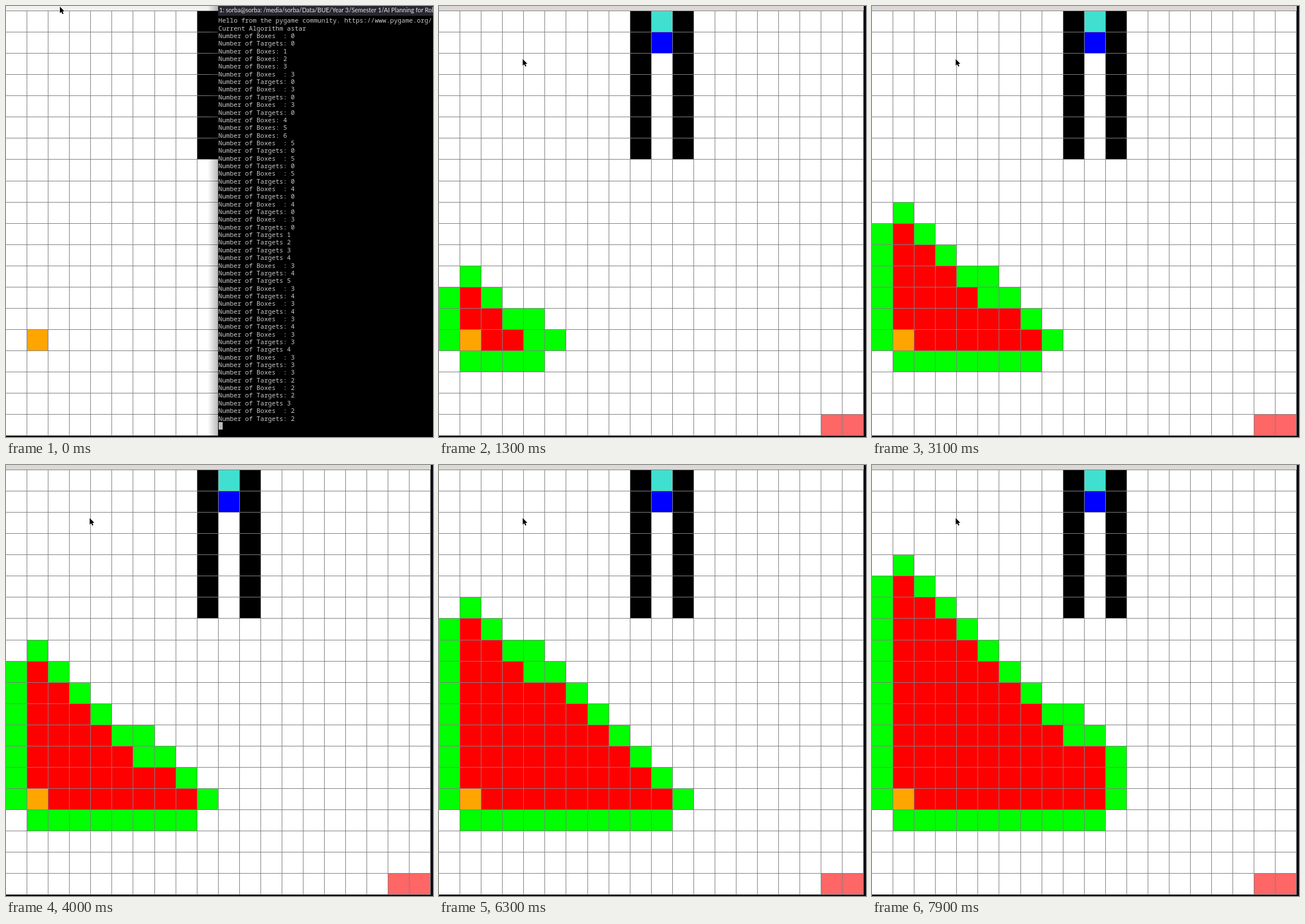
An HTML page with a canvas that plays this animation: 745 by 752 pixels, repeating every 8000 ms.

```html
<!DOCTYPE html>
<html lang="en">
<head>
<meta charset="utf-8">
<title>Grid search</title>
<style>
  html, body { margin: 0; width: 100%; height: 100%; overflow: hidden; background: #000; }
  canvas { display: block; }
</style>
</head>
<body>
<canvas id="stage" width="745" height="752"></canvas>
<script>
const W = 745, H = 752, LOOP = 8000, N = 20, EDGE = 741;
const START = [1, 15], GOAL_COL = 10;
const ctx = document.getElementById('stage').getContext('2d');

// Pixel of the grid line before column / row k
const lineX = k => Math.floor(37.05 * k - 0.3);
const lineY = k => Math.floor(8.55 + 37.06 * k);

// Cells in the order the search expands them: diagonal by diagonal, right end first
const order = [];
for (let d = 0; d <= 11; d++) {
  for (let c = Math.min(GOAL_COL, d + 1); c >= 1; c--) {
    order.push([c, START[1] - d + c - 1]);
  }
}

// Runs of search steps: start time, first step, number of steps (100 ms each)
const runs = [
  [600, 0, 3], [1000, 3, 11], [2200, 15, 1], [2400, 16, 1], [3100, 23, 2],
  [3500, 25, 15], [5100, 40, 11], [6300, 51, 9], [7300, 60, 7]
];

function stepAt(t) {
  let step = -1;
  for (const [at, first, count] of runs) {
    if (t >= at) step = first + Math.min(count - 1, Math.floor((t - at) / 100));
  }
  return step;
}

const log = ['Hello from the pygame community. https://www.pygame.org/', 'Current Algorithm astar'];
const labels = { B: 'Boxes  : ', b: 'Boxes: ', T: 'Targets: ', t: 'Targets ' };
const entries = 'B0 T0 b1 b2 b3 B3 T0 B3 T0 B3 T0 b4 b5 b6 B5 T0 B5 T0 B5 T0 B4 T0 B4 T0 ' +
  'B3 T0 t1 t2 t3 t4 B3 T4 t5 B3 T4 B3 T4 B3 T4 B3 T3 t4 B3 T3 B3 T2 B2 T2 t3 B2 T2';
for (const e of entries.split(' ')) log.push('Number of ' + labels[e[0]] + e[1]);

function rect(x, y, w, h, color) {
  ctx.fillStyle = color;
  ctx.fillRect(x, y, w, h);
}

function cell(c, r, color) {
  const x = c ? lineX(c) : 0, y = lineY(r);
  rect(x, y, lineX(c + 1) - x, lineY(r + 1) - y, color);
}

function drawSearch(step) {
  for (let i = 0; i <= step; i++) {
    const [c, r] = order[i];
    for (const [dx, dy] of [[1, 0], [-1, 0], [0, 1], [0, -1]]) cell(c + dx, r + dy, '#00ff00');
  }
  for (let i = 1; i < step; i++) cell(...order[i], '#ff0000');
}

function drawBoard(step, focused) {
  rect(0, 0, W, H, '#000');
  rect(EDGE, 0, W - EDGE, H, '#0a0b14');
  rect(0, 0, EDGE, 8, focused ? '#dcd8d5' : '#f2f1f0');
  rect(0, 8, EDGE, 742, '#fff');
  drawSearch(step);
  cell(...START, '#ffa500');
  for (let r = 0; r < 7; r++) {
    cell(9, r, '#000');
    cell(11, r, '#000');
  }
  cell(10, 0, '#40e0d0');
  cell(10, 1, '#0000ff');
  cell(18, 19, '#ff6666');
  cell(19, 19, '#ff6666');
  for (let k = 0; k <= N; k++) {
    if (k) rect(lineX(k), 8, 1, 742, '#808080');
    rect(0, lineY(k), EDGE, 1, '#808080');
  }
}

function drawTerminal() {
  const x = 370;
  const shade = ctx.createLinearGradient(x - 18, 0, x, 0);
  shade.addColorStop(0, 'rgba(0,0,0,0)');
  shade.addColorStop(1, 'rgba(0,0,0,0.28)');
  rect(x - 18, 0, 18, H, shade);
  rect(x, 0, W - x, H, '#000');
  rect(x, 0, W - x, 17, '#29272f');
  ctx.textBaseline = 'alphabetic';
  ctx.fillStyle = '#e4e4e4';
  ctx.font = '10.6px Lato, "Open Sans", sans-serif';
  ctx.fillText('1: sorba@sorba: /media/sorba/Data/BUE/Year 3/Semester 1/AI Planning for Robotics', x + 2, 11);
  ctx.fillStyle = '#c8c8c8';
  ctx.font = '11.1px "Noto Sans Mono", "DejaVu Sans Mono", monospace';
  log.forEach((s, i) => ctx.fillText(s, x + 0.5, 29.3 + i * 13.35));
  rect(x + 1, 726, 7, 13, '#bdbdbd');
}

const arrow = [[0, 0], [0, 11.5], [2.6, 9.2], [4.6, 13.2], [6.4, 12.3], [4.6, 8.5], [8, 8.2]];

function drawPointer(x, y) {
  ctx.beginPath();
  for (const [dx, dy] of arrow) ctx.lineTo(x + dx, y + dy);
  ctx.closePath();
  ctx.lineWidth = 1.4;
  ctx.strokeStyle = '#fff';
  ctx.stroke();
  ctx.fillStyle = '#000';
  ctx.fill();
}

function draw(time) {
  const t = Math.floor(time / 100 + 1e-6) * 100;
  drawBoard(stepAt(t), t >= 200);
  if (t < 100) drawTerminal();
  const move = Math.min(1, Math.max(0, (t - 400) / 300));
  drawPointer(94 + 52 * move, 1 + 91.5 * move);
}

const began = performance.now();
function frame() {
  draw((performance.now() - began) % LOOP);
  requestAnimationFrame(frame);
}
frame();
</script>
</body>
</html>
```
